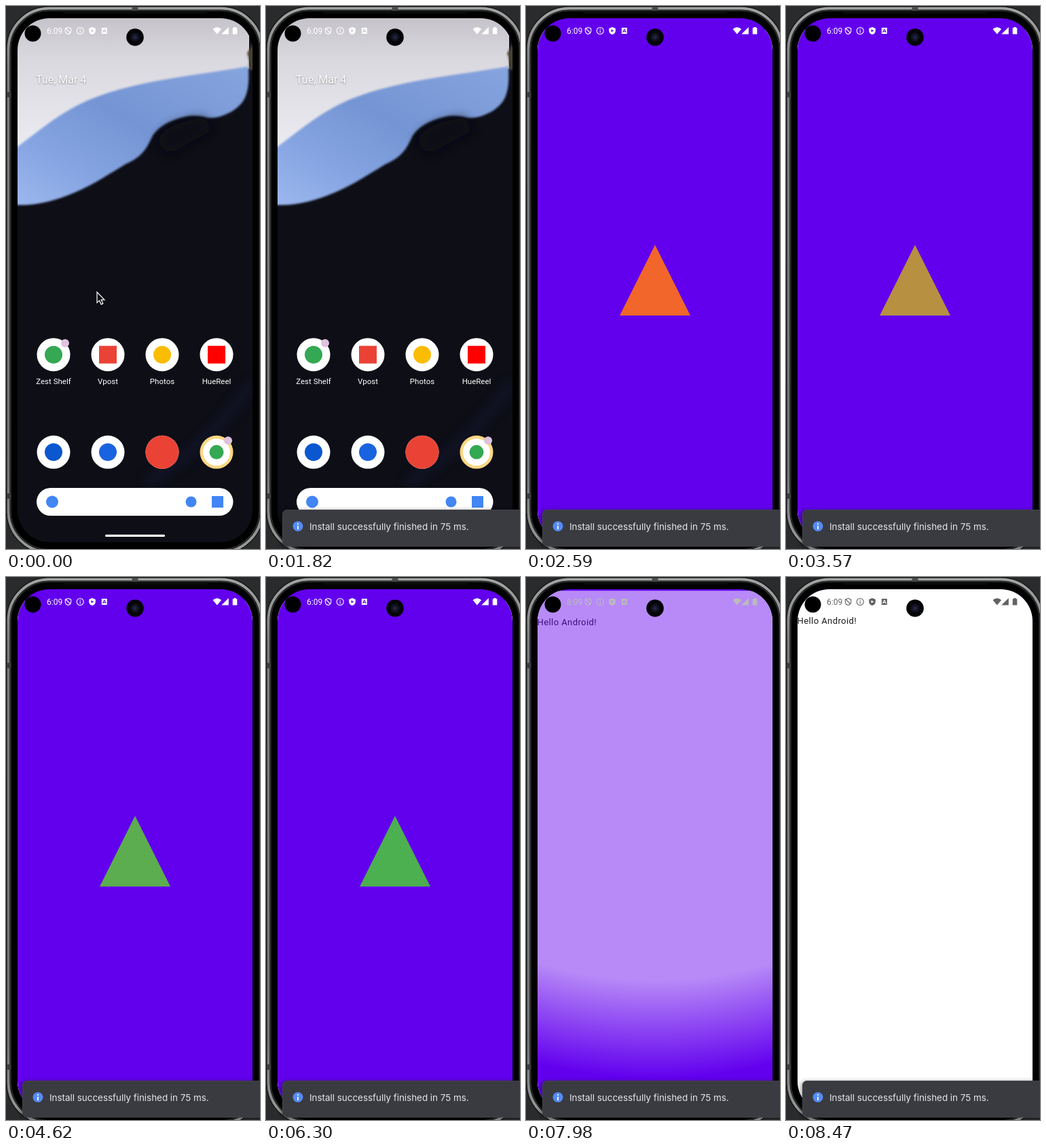
An HTML page for the animation above (8.68 s loop, 374 px wide and 800 px high).

```html
<!DOCTYPE html>
<html lang="en">
<head>
<meta charset="utf-8">
<title>App launch with splash screen</title>
<style>
  html, body { margin: 0; width: 100%; height: 100%; overflow: hidden; background: #2a2b2d; }
  svg { display: block; width: 374px; height: 800px; font-family: Roboto, sans-serif; }
  .label { font-size: 11.5px; fill: #fff; text-anchor: middle; }
  .date { font-size: 16px; fill: #fff; filter: drop-shadow(0 1px 1px rgba(0, 0, 0, .4)); }
  .hello { font-size: 13px; letter-spacing: .42px; fill: #1c1b1f; }
  .clock { font-size: 12px; fill: currentColor; }
  .toast { font: 13.4px Inter, sans-serif; fill: #e6e7ea; }
</style>
</head>
<body>
<svg viewBox="0 0 374 800">
  <defs>
    <clipPath id="screenClip"><rect x="17" y="18" width="346" height="772" rx="47"/></clipPath>
    <linearGradient id="metal" x2="0" y2="1">
      <stop offset="0" stop-color="#a2a4a4"/><stop offset=".12" stop-color="#7c7e7e"/>
      <stop offset=".85" stop-color="#737575"/><stop offset="1" stop-color="#9a9c9c"/>
    </linearGradient>
    <linearGradient id="sky" x2="0" y2="1">
      <stop offset="0" stop-color="#c3c0c7"/><stop offset=".3" stop-color="#d9d8de"/>
      <stop offset="1" stop-color="#eeeef4"/>
    </linearGradient>
    <linearGradient id="wing" x1="1" y1="0" x2="0" y2="1">
      <stop offset="0" stop-color="#86a4de"/><stop offset=".45" stop-color="#7494d3"/>
      <stop offset=".75" stop-color="#86a5e2"/><stop offset="1" stop-color="#9db8ee"/>
    </linearGradient>
    <radialGradient id="lens">
      <stop offset="0" stop-color="#2b2c52"/><stop offset=".5" stop-color="#15162a"/>
      <stop offset="1" stop-color="#0b0b10"/>
    </radialGradient>
    <radialGradient id="hole">
      <stop offset=".8"/><stop offset="1" stop-opacity="0"/>
    </radialGradient>
    <filter id="soft"><feGaussianBlur stdDeviation="1.6"/></filter>
    <filter id="haze" x="-50%" y="-50%" width="200%" height="200%"><feGaussianBlur stdDeviation="8"/></filter>
    <filter id="shade" x="-10%" y="-30%" width="120%" height="160%"><feGaussianBlur stdDeviation="3"/></filter>
    <mask id="vanish" maskUnits="userSpaceOnUse" x="0" y="0" width="374" height="800">
      <rect width="374" height="800" fill="#fff"/>
      <circle id="holeDisc" cx="190" cy="18" r="0" fill="url(#hole)"/>
    </mask>
  </defs>

  <!-- phone body -->
  <rect width="374" height="800" fill="#2a2b2d"/>
  <rect x="0" y="0" width="380" height="808" rx="64" fill="#111"/>
  <rect x="3.5" y="3.5" width="373" height="801" rx="60" fill="#000" stroke="url(#metal)" stroke-width="4"/>
  <rect x="6.8" y="6.8" width="366.4" height="794.4" rx="57" fill="#000" stroke="#2b2c2c" stroke-width="2"/>
  <path d="M1 130.5h6M1 722h6" stroke="#3c3d3d" stroke-width="8"/>
  <path d="M190 1.500v5" stroke="#4a4b4b" stroke-width="9"/>
  <path d="M84 10h212" stroke="#1d1d1e"/>

  <g clip-path="url(#screenClip)">
    <g id="home">
      <rect x="17" y="18" width="346" height="772" fill="#0d0e16"/>
      <path d="M10 10H358V92L215 140 10 230Z" fill="url(#sky)"/>
      <path d="M355 70q4 6 3 24h8V45q-4 14 -11 25Z" fill="#4a4133" filter="url(#soft)"/>
      <path d="M10 213C45 186 72 164 102 148 140 128 180 119 214 112 260 103 310 97 357 89C358 112 357 124 351 137
        C342 153 324 161 310 164C296 167 290 160 270 162C246 166 226 176 216 191C207 210 201 222 176 233
        C140 255 112 274 70 286C45 293 28 294 10 293Z" fill="url(#wing)" filter="url(#soft)"/>
      <path d="M222 201Q233 172 291 165L305 182 240 218Z" fill="#0d0e16" opacity=".85" filter="url(#haze)"/>
      <path d="M205 705C260 670 300 640 363 555" fill="none" stroke="#1b2148" stroke-width="18" opacity=".3" filter="url(#haze)"/>
      <text class="date" x="44" y="114">Tue, Mar 4</text>
      <g id="apps"></g>
      <rect x="45" y="710" width="289.500" height="41" rx="20.500" fill="#fff"/>
      <circle cx="68" cy="730.500" r="9" fill="#4285f4"/>
      <circle cx="272.500" cy="730.500" r="8" fill="#4285f4"/>
      <rect x="303" y="722" width="17" height="17" fill="#4285f4"/>
      <rect x="146" y="778.700" width="88" height="3.300" rx="1.600" fill="#fff"/>
    </g>

    <g id="app">
      <rect x="17" y="18" width="346" height="772" rx="47" fill="#6200ee"/>
      <g id="page">
        <rect x="17" y="18" width="346" height="790" fill="#fff"/>
        <text class="hello" x="16.500" y="69">Hello Android!</text>
      </g>
      <g id="splash" mask="url(#vanish)">
        <rect x="17" y="18" width="346" height="772" rx="47" fill="#6200ee"/>
        <path id="triangle" d="M190 352L242 456H138Z"/>
      </g>
    </g>

    <g id="status" fill="none" stroke="currentColor" stroke-width="1.100">
      <text class="clock" x="60" y="40.700" stroke="none">6:09</text>
      <path d="M91.500 31.500l4.200 1.700v3.200q0 3.600-4.200 5.200-4.200-1.600-4.200-5.200v-3.200zM88 33l7 7"/>
      <circle cx="109.200" cy="36.500" r="5"/>
      <path d="M109.200 33.300v1.400m0 1.100v3.700"/>
      <path fill="currentColor" stroke="none" fill-rule="evenodd" d="M127 31l4.800 1.900v3.500q0 4-4.800 5.700-4.800-1.700-4.800-5.700v-3.500zM125.500 34.200v4.400l3.800-2.200z"/>
      <path fill="currentColor" stroke="none" fill-rule="evenodd" d="M140.800 32h8v9h-8zM144.200 33.800l-2.300 5.300h1.200l.5-1.200h2.400l.5 1.200h1.200l-2.300-5.300zM144.800 35l.8 2h-1.600z"/>
      <path fill="currentColor" stroke="none" d="M304.500 34q6.300-5.500 12.600 0l-6.300 7.500zM327.800 31v10.500h-10.500zM333.700 32.300h1.800v-1.300h3v1.300h1.800v9.200h-6.600z"/>
    </g>
    <circle cx="39.500" cy="40.500" r="12"/>
    <circle cx="190" cy="46" r="12.800" fill="#050507"/>
    <circle cx="190" cy="46" r="7" fill="url(#lens)"/>
  </g>

  <path id="cursor" d="M134 421.500v15.600l3.500-3.200 2.600 5.700 2.700-1.200-2.500-5.500h4.700z" fill="#111" stroke="#fff" stroke-width="1.200"/>

  <g id="toast">
    <rect x="22" y="743" width="366" height="55" rx="7" opacity=".4" filter="url(#shade)"/>
    <rect x="24.500" y="742.500" width="366" height="53.500" rx="6" fill="#393b40" stroke="#43454a"/>
    <circle cx="47" cy="766.500" r="7.500" fill="#548af7"/>
    <path d="M47 762v2m0 1.700v5.300" stroke="#fff" stroke-width="1.800"/>
    <text class="toast" x="64" y="771.700">Install successfully finished in 75 ms.</text>
  </g>
</svg>
<script>
  const LOOP = 8680;
  const el = id => document.getElementById(id);
  const [apps, home, app, page, splash, holeDisc, triangle, status, cursor, toast] =
    ['apps', 'home', 'app', 'page', 'splash', 'holeDisc', 'triangle', 'status', 'cursor', 'toast'].map(el);

  // Launcher icons: mark colour, round or square mark, optional label and badge
  const icons = [
    { color: '#34a853', label: 'Zest Shelf', badge: true },
    { color: '#ea4335', label: 'Vpost', square: true },
    { color: '#fbbc04', label: 'Photos' },
    { color: '#ff0000', label: 'HueReel', square: true },
    { color: '#0b57d0' },
    { color: '#1a63e0' },
    { color: '#ea4335', size: 24.5 },
    { color: '#34a853', badge: true, ring: true },
  ];
  const disc = (x, y, r, fill) => `<circle cx="${x}" cy="${y}" r="${r}" fill="${fill}"/>`;
  apps.innerHTML = icons.map(({ color, label, badge, square, ring, size }, i) => {
    const x = 70 + 80 * (i % 4), y = i < 4 ? 513.7 : 657.3;
    const r = size || (ring ? 10.5 : 13);
    return disc(x, y, 24.5, ring ? '#fbd682' : '#fff')
      + (ring ? disc(x, y, 20, '#fff') : '')
      + (square ? `<rect x="${x - 13}" y="${y - 13}" width="26" height="26" fill="${color}"/>` : disc(x, y, r, color))
      + (badge ? disc(x + 17, y - 17, 6, '#dfc2de') : '')
      + (label ? `<text class="label" x="${x}" y="557">${label}</text>` : '');
  }).join('');

  const progress = (t, start, length) => Math.min(1, Math.max(0, (t - start) / length));

  function bezier(x1, y1, x2, y2) {
    const curve = (a, b, s) => 3 * a * s * (1 - s) ** 2 + 3 * b * s * s * (1 - s) + s ** 3;
    return x => {
      if (x <= 0 || x >= 1) return x;
      let low = 0, high = 1;
      for (let i = 0; i < 24; i++) {
        const mid = (low + high) / 2;
        if (curve(x1, x2, mid) < x) low = mid; else high = mid;
      }
      return curve(y1, y2, low);
    };
  }
  const easeRadius = bezier(0, 0, .4, 1);
  const easeAlpha = bezier(0, 0, .8, 1);
  const easeShift = bezier(0, 0, 0, 1);
  const easeOut = bezier(.2, 0, 0, 1);
  const easeInOut = x => (1 - Math.cos(Math.PI * x)) / 2;

  // Colours blend in linear light
  function mix(from, to, k) {
    const channels = from.map((v, i) => Math.round((v ** 2.2 * (1 - k) + to[i] ** 2.2 * k) ** (1 / 2.2)));
    return `rgb(${channels})`;
  }
  const ORANGE = [255, 87, 34], GREEN = [76, 175, 80];
  const WHITE = [255, 255, 255], GREY = [98, 98, 98];
  const REVEAL_RADIUS = 1.25 * Math.hypot(772, 173);

  function render(t) {
    const leave = progress(t, 40, 150);
    cursor.setAttribute('transform', `translate(${-150 * leave} ${-430 * leave})`);
    cursor.style.display = leave < 1 ? '' : 'none';

    toast.style.opacity = progress(t, 1100, 280);

    const open = progress(t, 1860, 300);
    const scale = .85 + .15 * easeOut(open);
    app.style.display = open > 0 ? '' : 'none';
    app.style.opacity = progress(t, 1860, 140);
    app.setAttribute('transform', `translate(190 404) scale(${scale}) translate(-190 -404)`);
    home.style.display = open < 1 ? '' : 'none';

    triangle.setAttribute('fill', mix(ORANGE, GREEN, easeInOut(progress(t, 1910, 3100))));
    triangle.style.opacity = 1 - progress(t, 7750, 80);

    const reveal = progress(t, 7750, 500);
    splash.style.display = reveal < 1 ? '' : 'none';
    holeDisc.setAttribute('r', REVEAL_RADIUS * easeRadius(reveal));
    holeDisc.setAttribute('opacity', easeAlpha(reveal));
    page.setAttribute('transform', `translate(0 ${17 * (1 - easeShift(reveal))})`);
    status.style.color = mix(WHITE, GREY, progress(t, 7880, 180));
  }

  const start = performance.now();
  function frame() {
    render((performance.now() - start) % LOOP);
    requestAnimationFrame(frame);
  }
  frame();
</script>
</body>
</html>
```
